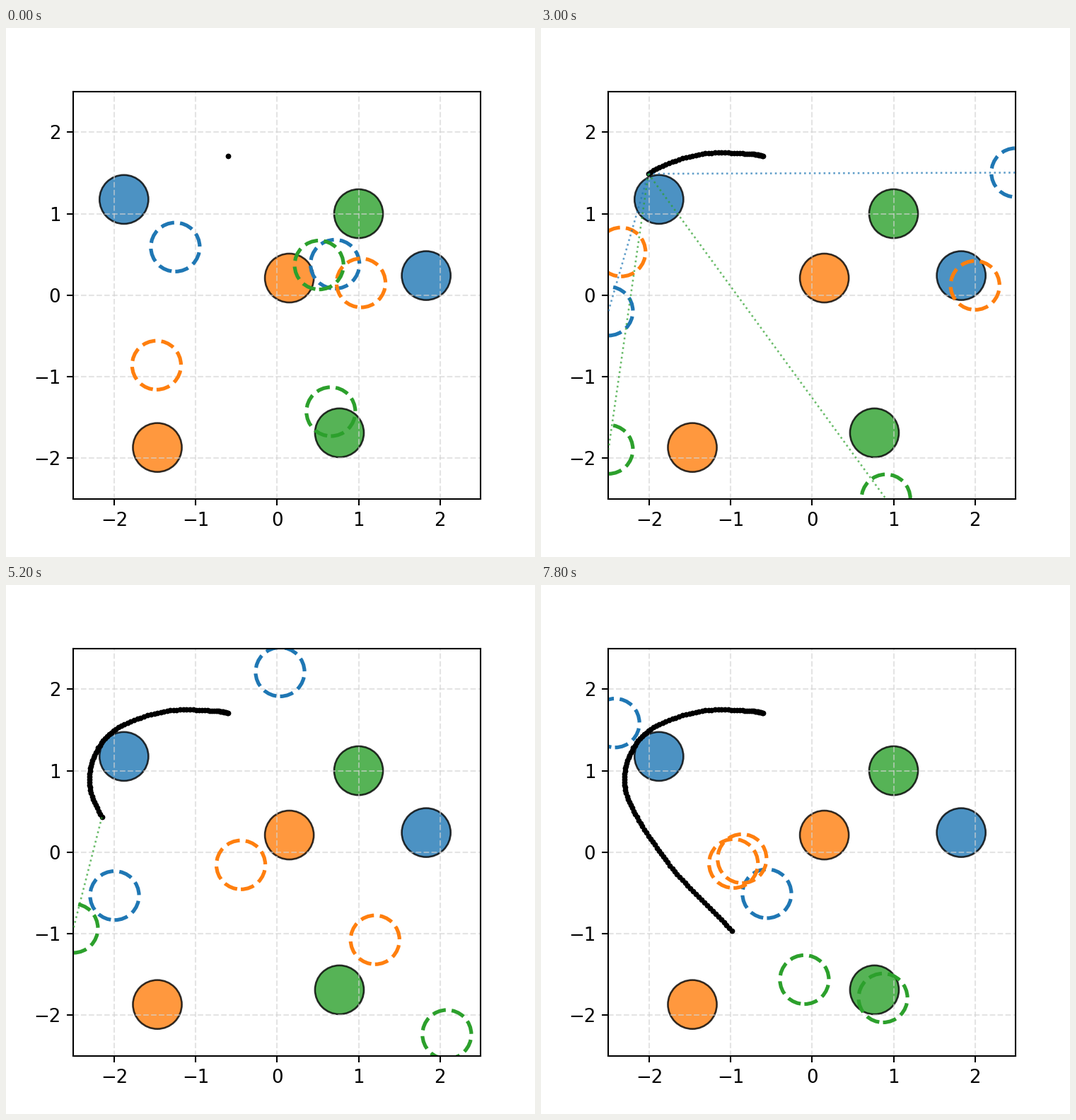
A matplotlib script that plays this animation: 748x748 px, repeating every 8000 ms.

```python
import matplotlib.pyplot as plt
import numpy as np
from matplotlib.animation import FuncAnimation
from matplotlib.patches import Circle

FRAMES, STEP = 40, 200
LIM, RADIUS = 2.5, 0.3
DOTS = 3          # trail dots per frame
SWING = 0.035     # outward drift of a ring between two key poses
COLORS = ["#1f77b4", "#ff7f0e", "#2ca02c"]

# Positions are complex numbers x + yj; two landmarks and two rings per colour.
LANDMARKS = [-1.88+1.175j, 1.83+.24j, .15+.21j, -1.47-1.87j, 1+1j, .765-1.69j]

# Key poses at these time steps; rings beyond the view are pinned to its border.
KEYS = np.array([0, 4, 10, 15, 22, 30, 39])
WALK = [-.6+1.71j, -.775+1.735j, -1.43+1.72j, -2.01+1.49j, -2.305+.86j,
        -1.855-.02j, -.985-.97j]
RINGS = [
    [-1.25+.59j, -.565+.105j, -2.8+1.3j, -2.6-.54j, -1.3-.465j, -2.065-.19j, -2.42+1.585j],
    [.71+.38j, .73-1.57j, 2.8+2.015j, 2.9+1.505j, .06+2.7j, .34+.44j, -.555-.51j],
    [1.03+.15j, .12+1.86j, -2.6-2j, -2.345+.53j, -.75-.19j, -.255+.04j, -.965-.14j],
    [-1.48-.86j, .255-.79j, 1.535-1.36j, 2+.12j, 1.47-1.38j, .345-.055j, -.86-.08j],
    [.515+.37j, .49+.215j, 1.825-.78j, 1.015-2.65j, 1.52-1.635j, 1.585-2j, .87-1.79j],
    [.66-1.43j, -.1-2.03j, -2-1.81j, -2.53-2.1j, -2.52-2.2j, -1.725-1.295j, -.095-1.565j],
]


def glide(poses, t, swing=0):
    """Smooth cubic path through the key poses."""
    p = np.array(poses)
    m = np.gradient(p, KEYS)
    i = min(np.searchsorted(KEYS, t, "right"), len(KEYS) - 1) - 1
    h = KEYS[i + 1] - KEYS[i]
    u = (t - KEYS[i]) / h
    ease = u * u * (3 - 2 * u)
    bend = u * (1 - u) * h * (m[i] * (1 - u) - m[i + 1] * u)
    pos = p[i] + (p[i + 1] - p[i]) * ease + bend
    return pos * (1 + swing * h * np.sin(np.pi * u) ** 2)


def to_border(start, end):
    """Point where the ray towards an outside point leaves the view."""
    d = end - start
    scale = min((np.sign(v) * LIM - s) / v
                for s, v in ((start.real, d.real), (start.imag, d.imag)) if v)
    return start + d * scale


fig, ax = plt.subplots(figsize=(4, 4), dpi=187)
ax.set(xlim=(-LIM, LIM), ylim=(-LIM, LIM), aspect="equal",
       xticks=range(-2, 3), yticks=range(-2, 3))
ax.grid(ls="--", color="lightgray", alpha=0.6)

walk = np.array([glide(WALK, k / DOTS) for k in range((FRAMES - 1) * DOTS + 1)])
trail, = ax.plot([], [], "o", color="black", ms=3, mew=0, zorder=3)

rings, rays = [], []
for k, spot in enumerate(LANDMARKS):
    color = COLORS[k // 2]
    ax.add_patch(Circle((spot.real, spot.imag), RADIUS, fc=color, ec="black", alpha=0.8))
    rings.append(ax.add_patch(Circle((0, 0), RADIUS, fill=False, ec=color,
                                     lw=2, ls="--", zorder=2)))
    rays.append(ax.plot([], [], ":", color=color, lw=1, alpha=0.7, zorder=4)[0])


def draw(n):
    seen = walk[:n * DOTS + 1]
    head = seen[-1]
    trail.set_data(seen.real, seen.imag)
    for poses, ring, ray in zip(RINGS, rings, rays):
        pos = glide(poses, n, SWING)
        outside = max(abs(pos.real), abs(pos.imag)) > LIM
        if outside:
            pos = to_border(head, pos)
            ray.set_data([head.real, pos.real], [head.imag, pos.imag])
        ray.set_visible(outside)
        ring.center = pos.real, pos.imag
    return [trail, *rings, *rays]


anim = FuncAnimation(fig, draw, frames=FRAMES, init_func=lambda: draw(0),
                     interval=STEP, repeat=True, repeat_delay=0, blit=False)
plt.show()
```
